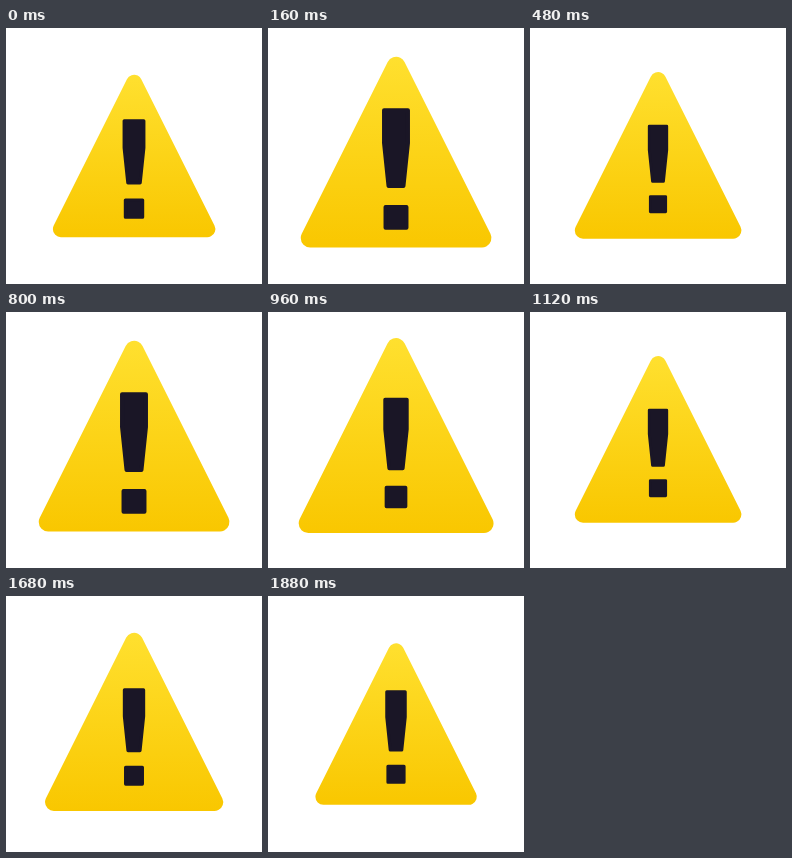
An HTML page for the animation above (1920 ms loop, 256 by 256 pixels).

```html
<!DOCTYPE html>
<html lang="en">
<head>
<meta charset="utf-8">
<title>Pulsing warning sign</title>
<style>
  html, body { margin: 0; height: 100%; overflow: hidden; background: #fff; }
  svg { display: block; width: 100%; height: 100%; }
  path { stroke-linejoin: round; }
</style>
</head>
<body>
<svg viewBox="0 0 256 256">
  <linearGradient id="gold" gradientUnits="userSpaceOnUse" x1="0" y1="-103" x2="0" y2="59">
    <stop offset="0" stop-color="#ffe02f"/>
    <stop offset="1" stop-color="#f9c700"/>
  </linearGradient>
  <path id="sign" d="M0-95L73 51H-73Z" fill="url(#gold)" stroke="url(#gold)" stroke-width="16"/>
  <path id="mark" d="M-12-59H12V-26L7.5 17H-7.5L-12-26ZM-10.5 38H10.5V59H-10.5Z"
        fill="#1a1626" stroke="#1a1626" stroke-width="4"/>
</svg>
<script>
const PERIOD = 640, HALF = PERIOD / 2, STEP = 40;
const sign = document.getElementById('sign');
const mark = document.getElementById('mark');

// cubic-bezier(.25, .1, .25, 1)
function ease(x) {
  const curve = (a, b, u) => 3 * a * u * (1 - u) ** 2 + 3 * b * u * u * (1 - u) + u ** 3;
  let lo = 0, hi = 1;
  for (let i = 0; i < 20; i++) {
    const mid = (lo + hi) / 2;
    if (curve(.25, .25, mid) < x) lo = mid; else hi = mid;
  }
  return curve(.1, 1, lo);
}

function place(el, x, y, scale) {
  el.setAttribute('transform', `translate(${x} ${y}) scale(${scale})`);
}

function draw(t) {
  // The sign grows and shrinks with an ease; the mark swings smoothly ahead of it.
  const phase = (t + 16) % PERIOD;
  const grow = phase < HALF ? ease(phase / HALF) : 1 - ease(phase / HALF - 1);
  place(sign, 128.1, 150, (161.3 + 34.7 * grow) / 162);
  place(mark, 128, 141, .862 + .143 * Math.sin(2 * Math.PI * (t - 33) / PERIOD));
}

const start = performance.now();
function tick() {
  const t = Math.max(0, performance.now() - start);
  draw(Math.floor(t / STEP) * STEP % (3 * PERIOD));
  requestAnimationFrame(tick);
}
tick();
</script>
</body>
</html>
```
